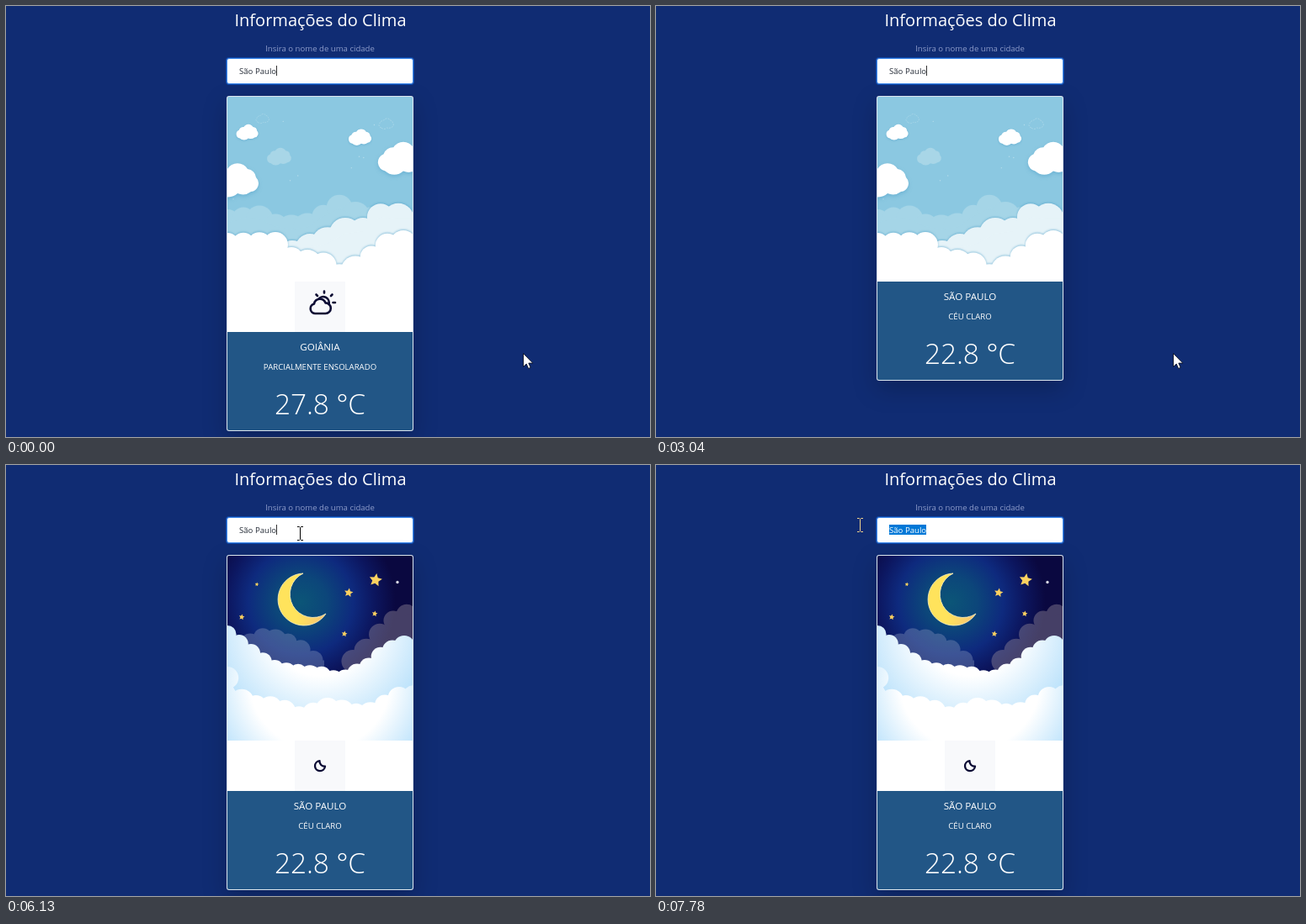
Animation, 765 px wide and 513 px high, one loop 8000 ms. Source, as an HTML page:

```html
<!DOCTYPE html>
<html lang="pt-BR">
<head>
<meta charset="utf-8">
<title>Informações do Clima</title>
<style>
  html, body { margin: 0; width: 100%; height: 100%; overflow: hidden; background: #102c73; }
  svg { display: block; width: 765px; height: 513px; }
  text { font-family: "Open Sans", "Noto Sans", sans-serif; fill: #fff; }
  .mid { text-anchor: middle; }
  .title { font-size: 20px; }
  .small { font-size: 9.6px; }
  .city { font-size: 11.6px; }
  .temp { font-size: 33.5px; font-weight: 300; letter-spacing: -.2px; }
  .line { fill: none; stroke: #0b0b33; stroke-linecap: round; stroke-linejoin: round; }
  .shade { filter: drop-shadow(0 10px 14px rgba(0, 0, 0, .2)); }
  .edge { filter: drop-shadow(0 -1px 1px rgba(80, 160, 200, .55)); }
  .soft { filter: drop-shadow(0 1px 1px rgba(80, 160, 200, .5)); }
  #beam { mix-blend-mode: difference; fill: none; stroke: #fff; }
</style>
</head>
<body>
<svg viewBox="0 0 765 513">
  <defs>
    <clipPath id="photo"><path d="M263 328V110q0-2 2-2H481q2 0 2 2V328z"/></clipPath>
    <clipPath id="picked"><rect id="pick" x="321" y="71" width="0" height="12"/></clipPath>
    <radialGradient id="sky" gradientUnits="userSpaceOnUse" cx="350" cy="163" r="125">
      <stop offset="0" stop-color="#0b5577"/><stop offset=".25" stop-color="#0c467a"/>
      <stop offset=".5" stop-color="#0e2a7e"/><stop offset=".7" stop-color="#0c165f"/>
      <stop offset=".9" stop-color="#0a0840"/>
    </radialGradient>
    <radialGradient id="mist" gradientUnits="userSpaceOnUse" cx="373" cy="190" r="135">
      <stop offset=".45" stop-color="#fff"/><stop offset="1" stop-color="#b9e1fb"/>
    </radialGradient>
    <radialGradient id="fog" gradientUnits="userSpaceOnUse" cx="373" cy="255" r="140">
      <stop offset=".6" stop-color="#fff"/><stop offset="1" stop-color="#b9e1fb"/>
    </radialGradient>
    <linearGradient id="gold">
      <stop offset=".4" stop-color="#ffe35c"/><stop offset="1" stop-color="#f5c274"/>
    </linearGradient>
    <path id="cloud" d="M-10 8a5.500 5.500 0 0 1-1-10.500a6 6 0 0 1 6-4a7 7 0 0 1 12 0a5.500 5.500 0 0 1 5 5a5 5 0 0 1-3 8.500a8 8 0 0 1-8 1a8 8 0 0 1-11 0z"/>
  </defs>

  <rect width="765" height="513" fill="#102c73"/>
  <text class="title mid" x="373.500" y="24">Informações do Clima</text>
  <text class="small mid" x="373" y="54" style="fill:#8d9cca">Insira o nome de uma cidade</text>

  <rect x="261" y="61" width="224" height="33" rx="4" fill="#0d5fd6" opacity=".55"/>
  <rect x="262.500" y="62.500" width="221" height="30" rx="2.500" fill="#fff" stroke="#3f88ea"/>
  <text class="small" x="277" y="81" style="fill:#262d38">São Paulo</text>
  <path id="caret" d="M321.500 71v12" stroke="#333"/>
  <g clip-path="url(#picked)">
    <rect x="277" y="71" width="45" height="12" fill="#0078d7"/>
    <text class="small" x="277" y="81">São Paulo</text>
  </g>

  <rect id="card" class="shade" x="262" y="107" width="222" height="399" rx="3" fill="#dce6ee"/>
  <g id="strip">
    <path d="M263 328h220v60h-220z" fill="#fff"/>
    <path d="M343 328h60v60h-60z" fill="#f8f9fb"/>
    <g id="sunIcon" class="line" stroke-width="2.600">
      <path d="M367 366a5.800 5.800 0 0 1-1-11.400a7 7 0 0 1 13.500-1.200a6.300 6.300 0 0 1 0 12.600z"/>
      <path d="M371.500 348.500a7 7 0 0 1 12 6.500M378 339.500v2M368.500 343.500l1.500 1.500M387.500 343.500l-1.500 1.500M388.500 353h2.500"/>
    </g>
    <path id="moonIcon" class="line" stroke-width="2.300" d="M372.500 352.200a6 6 0 1 0 6.500 6.500a6 6 0 0 1-6.500-6.500z"/>
  </g>
  <g id="info">
    <path d="M263 388h220v115q0 2-2 2H265q-2 0-2-2z" fill="#225686"/>
    <text id="city" class="city mid" x="373" y="410"></text>
    <text id="state" class="small mid" x="373" y="433"></text>
    <text id="temp" class="temp mid" x="373" y="486"></text>
  </g>
  <g id="day" clip-path="url(#photo)"></g>
  <g id="night" clip-path="url(#photo)"></g>

  <path id="arrow" d="M.500.500v16l3.700-3.500l2.400 5.500l2.600-1.100l-2.400-5.300h5z" fill="#fff" stroke="#0a1022" stroke-width=".9"/>
  <path id="beam" d="M-3.500-7.500h2.500l1 1l1-1h2.500M0-6.500v14M-3.500 8.500h2.500l1-1l1 1h2.500"/>
</svg>
<script>
const $ = id => document.getElementById(id);
const LOOP = 8000, STEP = 70, FLOOR = 328;

let seed = 7;
const rand = () => (seed = seed * 16807 % 2147483647) / 2147483647;
const mix = (a, b, p) => a + (b - a) * p;

// A bank of cloud: round bumps whose tops follow a line through a few points.
function bank(line, gap, fill, extra = "") {
  const pts = line.split(" ").map(p => p.split(",").map(Number));
  const first = pts[0][0], last = pts[pts.length - 1][0];
  let bumps = "", body = `M${first} ${FLOOR}`;
  for (let x = first; x <= last; x += gap) {
    const i = Math.max(1, pts.findIndex(p => p[0] >= x));
    const [[x0, y0], [x1, y1]] = [pts[i - 1], pts[i]];
    const r = gap * (.68 + .25 * rand());
    const y = mix(y0, y1, (x - x0) / (x1 - x0)) + r;
    bumps += `<circle cx="${x}" cy="${y}" r="${r}"/>`;
    body += `L${x} ${y}`;
  }
  return `<g fill="${fill}" ${extra}>${bumps}<path d="${body}H${last}V${FLOOR}z"/></g>`;
}

const cloud = (x, y, size, look) =>
  `<use href="#cloud" transform="translate(${x} ${y}) scale(${size})" ${look}/>`;

const star = (x, y, r) => {
  const pts = Array.from({ length: 10 }, (_, i) => {
    const a = i * Math.PI / 5 - 1.4, d = i % 2 ? r * .48 : r;
    return `${x + d * Math.cos(a)},${y + d * Math.sin(a)}`;
  });
  return `<polygon points="${pts.join(" ")}" fill="#fbd160"/>`;
};

const speck = () =>
  `<circle cx="${mix(270, 475, rand())}" cy="${mix(110, 240, rand())}" r=".7" fill="#b5dcea"/>`;

const backdrop = fill => `<path d="M263 108h220v220h-220z" fill="${fill}"/>`;
const white = 'fill="#fff" class="soft"';
const dashed = 'fill="none" stroke="#b9deeb" stroke-dasharray="3 2"';
const faint = 'opacity=".42"';

$("day").innerHTML = backdrop("#8bc8e1") + Array.from({ length: 8 }, speck).join("") +
  cloud(305, 134, .55, dashed) + cloud(452, 140, .62, dashed) +
  cloud(325, 179, 1.03, 'fill="#a8d6e7"') +
  cloud(287, 150, .93, white) + cloud(421, 156, .97, white) +
  cloud(470, 181, 1.95, white) + cloud(273, 207, 2, white) +
  bank("263,242 300,237 325,250 362,246 399,223 420,236 445,242", 19, "#a5d5e7") +
  bank("340,279 385,262 410,248 428,253 448,232 486,238", 21, "#e6f3f8", 'class="edge"') +
  bank("263,270 322,269 340,288 375,292 397,308 428,290 458,267 486,267", 19, "#fff", 'class="edge"');

$("night").innerHTML = backdrop("url(#sky)") +
  bank("275,207 310,192 345,204 378,232", 15, "#7f8fb8", faint) +
  bank("412,220 430,205 455,176 486,161", 16, "#9a8c9c", faint) +
  `<path d="M353 129A31 31 0 1 0 380 177A27.600 27.600 0 1 1 353 129z"
    fill="url(#gold)" stroke="#fff3c0" stroke-width=".8"/>` +
  star(439, 137, 8) + star(407, 152, 5.5) + star(438, 177, 3.5) + star(402, 201, 3.5) +
  star(280, 181, 3.5) + star(298, 142, 2.5) +
  '<circle cx="465" cy="139.500" r="1.700" fill="#d5d4e0"/>' +
  bank("263,191 300,220 322,234 378,240 396,247 432,229 450,212 486,198", 14, "url(#mist)") +
  bank("263,240 284,273 322,276 350,288 385,276 425,286 446,276 466,264 486,262", 17, "url(#fog)");

// Pointer legs as [start, end, x, y]; it rests between them.
const legs = [
  [3700, 4540, 349, 81],
  [6130, 6480, 665, 484],
  [6480, 6900, 399, 150],
  [6900, 7180, 353, 88],
  [7240, 7520, 255, 69],
  [7580, 7650, 232, 66],
  [7710, 7780, 242, 71]
];
const DRAG = 7310;

function pointer(t) {
  let x = 614, y = 413;
  for (const [start, end, toX, toY] of legs) {
    if (t < start) break;
    const p = Math.min(1, Math.floor((t - start) / STEP) * STEP / (end - start));
    const e = p * p * (3 - 2 * p);
    x = Math.round(mix(x, toX, e));
    y = Math.round(mix(y, toY, e));
  }
  return [x, y];
}

const show = (id, on) => { $(id).style.display = on ? "" : "none"; };
const put = (id, s) => { if ($(id).textContent !== s) $(id).textContent = s; };

function draw(t) {
  const fresh = t >= 2960, short = t >= 3040 && t < 3110, dark = t >= 3110;
  put("city", fresh ? "SÃO PAULO" : "GOIÂNIA");
  put("state", fresh ? "CÉU CLARO" : "PARCIALMENTE ENSOLARADO");
  put("temp", fresh ? "22.8 °C" : "27.8 °C");
  show("day", !dark);
  show("night", dark);
  show("sunIcon", !dark);
  show("moonIcon", dark);
  show("strip", !short);
  $("card").setAttribute("height", short ? 339 : 399);
  $("info").setAttribute("transform", `translate(0 ${short ? -60 : 0})`);

  const [x, y] = pointer(t);
  const drag = t >= DRAG;
  const typing = drag || (x > 262 && x < 484 && y > 62 && y < 93);
  show("beam", typing);
  show("arrow", !typing);
  $("beam").setAttribute("transform", `translate(${x + .5} ${y})`);
  $("arrow").setAttribute("transform", `translate(${x} ${y})`);

  // The drag picks whole letters, from the end of the word to the pointer.
  const part = Math.min(1, Math.max(0, (x - 277) / 44));
  const from = drag ? 277 + 44 * Math.round(part * 9) / 9 : 321;
  $("pick").setAttribute("x", from);
  $("pick").setAttribute("width", 321 - from);
  const blink = t >= 190 && t < 1780 && Math.floor((t - 190) / 530) % 2 === 0;
  show("caret", from === 321 && !blink);
}

const begin = performance.now();
(function tick() {
  draw((performance.now() - begin) % LOOP);
  requestAnimationFrame(tick);
})();
</script>
</body>
</html>
```
